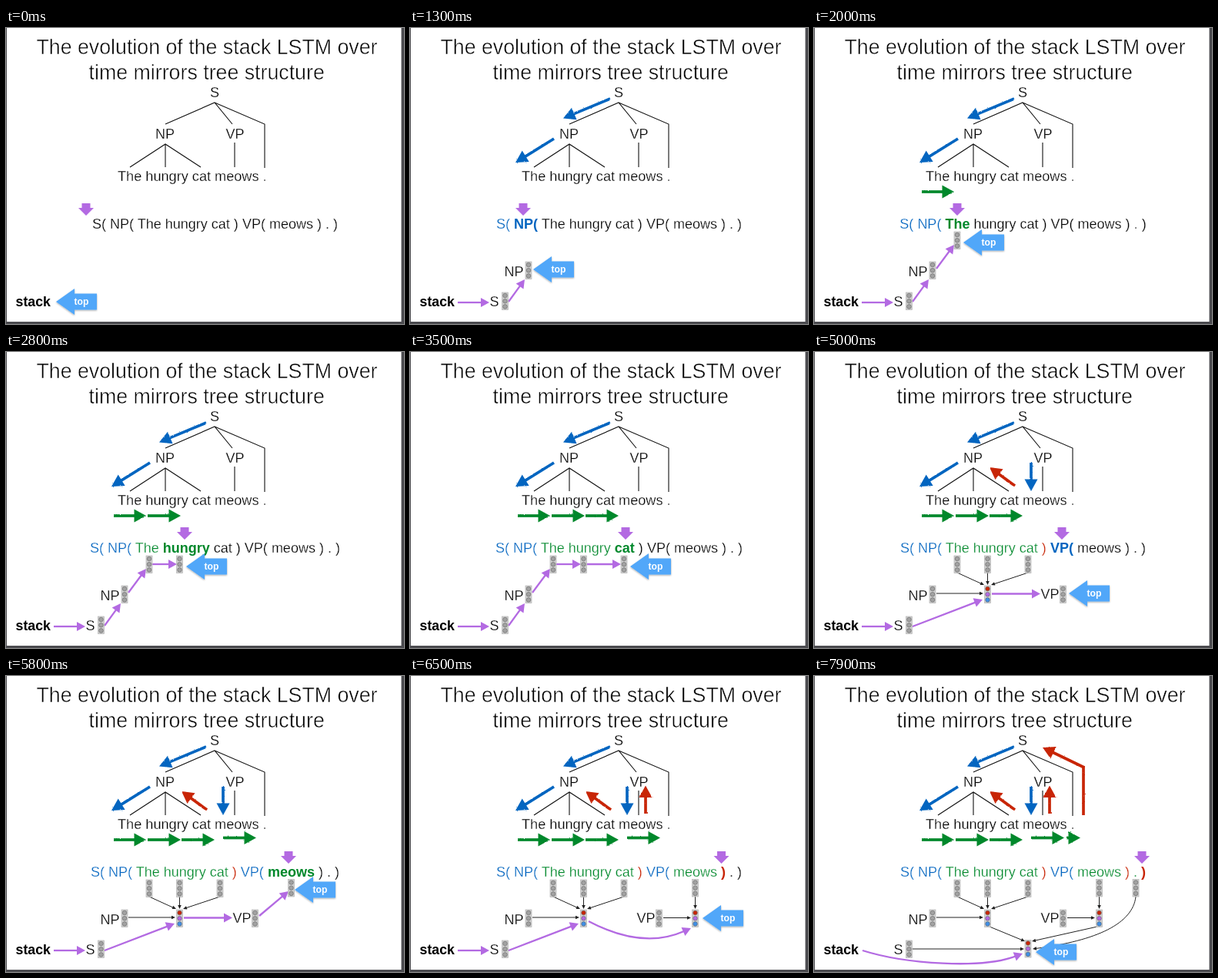
Write an HTML page that moves like this. It is 517x385 px and loops after 8 s.

```html
<!DOCTYPE html>
<html lang="en">
<head>
<meta charset="utf-8">
<title>Stack and tree</title>
<style>
  html, body { margin: 0; width: 100%; height: 100%; overflow: hidden; background: #fff; }
  svg { display: block; width: 517px; height: 385px; }
  text { font: 18px "Liberation Sans", Arial, sans-serif; white-space: pre; }
  /* A thin white outline lightens the strokes of the regular weight. */
  .light { stroke: #fff; stroke-width: .3px; }
  .title { font-size: 26.75px; stroke-width: .6px; }
  .bold { font-weight: 700; stroke: none; }
</style>
</head>
<body>
<svg id="stage" viewBox="0 0 517 385" xmlns="http://www.w3.org/2000/svg">
  <defs>
    <filter id="chalk" filterUnits="userSpaceOnUse" x="0" y="0" width="517" height="385" color-interpolation-filters="sRGB">
      <feTurbulence type="fractalNoise" baseFrequency=".4" numOctaves="2" seed="4"/>
      <feDisplacementMap in="SourceGraphic" scale="2" xChannelSelector="R" yChannelSelector="G"/>
    </filter>
    <filter id="shadow" x="-20%" y="-20%" width="140%" height="150%">
      <feDropShadow dx="0" dy="1" stdDeviation=".8" flood-opacity=".35"/>
    </filter>
  </defs>
</svg>
<script>
const BLUE = '#0365c0', GREEN = '#00882b', RED = '#c82506';
const PURPLE = '#b36ae2', SKY = '#51a7f9', BLACK = '#000', EDGE = '#4b4b4f';
const LOOP = 8000;
const STARTS = [0, 600, 1300, 2000, 2800, 3500, 4300, 5000, 5800, 6500, 7300, 7900];

const stage = document.getElementById('stage');
const timed = [];

function add(tag, attrs, parent = stage) {
  const node = document.createElementNS(stage.namespaceURI, tag);
  for (const key in attrs) node.setAttribute(key, attrs[key]);
  parent.append(node);
  return node;
}

function label(text, x, y, attrs = {}, parent = stage) {
  const node = add('text', { x, y, class: 'light', ...attrs }, parent);
  node.textContent = text;
  return node;
}

// A group visible from step `from` up to, not including, step `to`.
function during(from, to = Infinity) {
  const node = add('g', {});
  timed.push({ node, from, to });
  return node;
}

// Two points give a line, three a quadratic and four a cubic curve.
function arrow(parent, points, { color, width, length, half }) {
  const [x, y] = points.at(-1), [px, py] = points.at(-2);
  const size = Math.hypot(x - px, y - py);
  const ux = (x - px) / size, uy = (y - py) / size;
  const bx = x - ux * length, by = y - uy * length;
  const path = [...points.slice(1, -1), [bx + ux, by + uy]];
  add('path', {
    d: `M${points[0]} ${' LQC'[path.length]}${path.join(' ')}`,
    fill: 'none', stroke: color, 'stroke-width': width
  }, parent);
  add('path', {
    d: `M${x},${y} L${bx - uy * half},${by + ux * half} L${bx + uy * half},${by - ux * half}Z`,
    fill: color
  }, parent);
}

const LINK = { color: PURPLE, width: 2.3, length: 11, half: 6 };
const MERGE = { color: '#222', width: 1, length: 5, half: 2.3 };

const link = (from, to, ...points) => arrow(during(from, to), points, LINK);
const merge = (from, ...points) => arrow(during(from), points, MERGE);

function walk(from, color, ...points) {
  const group = during(from);
  group.setAttribute('filter', 'url(#chalk)');
  arrow(group, points, { color, width: 3.7, length: 15.5, half: 8.5 });
  return group;
}

function cell(from, x, y, colors = ['#a2a2a2', '#a2a2a2', '#a2a2a2']) {
  const group = during(from);
  add('rect', { x: x - 4, y: y - 11, width: 8, height: 22.5, fill: '#cfcfcf', stroke: '#b4b4b4', 'stroke-width': .7 }, group);
  colors.forEach((fill, i) => add('circle', {
    cx: x, cy: y - 7 + i * 7.2, r: 2.8, fill, stroke: '#666', 'stroke-width': .6
  }, group));
}
const mixed = (from, x, y) => cell(from, x, y, [RED, PURPLE, '#3f8fe6']);

// Slide edges and title
add('rect', { width: 517, height: 385, fill: EDGE });
add('rect', { x: 1, width: 512.5, height: 382, fill: '#fff' });
const titleStyle = { class: 'light title', 'text-anchor': 'middle' };
label('The evolution of the stack LSTM over', 261, 34, titleStyle);
label('time mirrors tree structure', 260.7, 67, titleStyle);

// Tree
add('path', {
  d: 'M207 125 L271 97 L294 125 M271 97 L336 125 V182 M161 181 L207 151 L253 181 M207 151 V181 M297 149 V181',
  fill: 'none', stroke: '#111', 'stroke-width': 1.1
});
const centered = { 'text-anchor': 'middle' };
label('S', 271, 90, centered);
label('NP', 206.5, 144, centered);
label('VP', 297.5, 144, centered);
label('The hungry cat meows .', 145, 198.5, { style: 'font-size:18.15px' });

// Walk around the tree
walk(1, BLUE, [260, 92], [199, 117.5]);
walk(2, BLUE, [187, 144], [137, 175]);
walk(3, GREEN, [140, 213], [182, 213]);
walk(4, GREEN, [184, 213], [227, 213]);
walk(5, GREEN, [228, 213], [271, 213]);
walk(6, RED, [261, 174], [228, 150]);
walk(7, BLUE, [282, 144], [282, 181]);
walk(8, GREEN, [282, 210.5], [325, 210.5]);
walk(9, RED, [306, 179], [306, 142.5]);
walk(10, GREEN, [328, 210.5], [346, 210.5]);
const back = walk(11, RED, [351, 119], [297, 93]);
add('path', { d: 'M350 181 V117', stroke: RED, 'stroke-width': 3.7 }, back);

// Action sequence
const TOKENS = [
  ['S(', BLUE], ['NP(', BLUE], ['The', GREEN], ['hungry', GREEN], ['cat', GREEN], [')', RED],
  ['VP(', BLUE], ['meows', GREEN], [')', RED], ['.', GREEN], [')', RED]
];
const sequence = label('', 271.5, 261, centered);
const spans = TOKENS.map(([word], i) => {
  const span = add('tspan', {}, sequence);
  span.textContent = word;
  if (i < TOKENS.length - 1) add('tspan', {}, sequence).textContent = ' ';
  return span;
});
const POINTER_X = [104, 121, 147, 186, 232, 280, 296.5, 322, 367, 404.5, 417, 426];
const pointer = add('path', { d: 'M-5.5 -16 H5.5 V-10 H10 L0 0 L-10 -10 H-5.5Z', fill: PURPLE });

// Stack
label('stack', 12.5, 361.5, { class: 'bold', style: 'font-size:17.8px' });
label('S', 103.5, 362, {}, during(1));
label('NP', 122.5, 322.5, {}, during(2));
label('VP', 294.5, 320.5, {}, during(7));

link(1, 11, [62, 357], [103, 357]);
link(2, 6, [128, 356], [149, 327]);
link(3, 6, [159, 313], [182, 282]);
link(4, 6, [190, 276], [222, 276]);
link(5, 6, [230, 276], [274, 276]);
link(6, 11, [128, 357], [219, 322]);
link(7, 9, [231, 314.5], [294, 314.5]);
link(8, 9, [329, 312], [367, 280]);
link(9, 11, [232, 319], [302, 356], [365, 328]);
link(10, 11, [376, 311], [414, 281]);
link(11, Infinity, [63, 357], [120, 375], [218, 381], [271, 361]);

merge(6, [186, 287], [221, 303]);
merge(6, [225.5, 287], [225.5, 303]);
merge(6, [278, 287], [230, 303]);
merge(6, [159, 314], [220, 314]);
merge(9, [329, 314.5], [365, 314.5]);
merge(9, [370.5, 287], [370.5, 303]);
merge(11, [228, 326], [274, 345]);
merge(11, [368, 326], [283, 345]);
merge(11, [418, 287], [414, 322], [368, 344], [284, 355]);
merge(11, [128, 355], [273, 355]);

cell(1, 123.5, 355);
cell(2, 154, 315);
cell(3, 186, 276);
cell(4, 225.5, 276);
cell(5, 278, 276);
mixed(6, 225.5, 315);
cell(7, 323.5, 315);
cell(8, 370.5, 275.5);
mixed(9, 370.5, 315);
cell(10, 418, 275.5);
mixed(11, 278, 354.5);

const TOPS = [
  [65, 356], [130, 356], [160, 314], [194, 279], [234, 279], [286, 279],
  [233, 314], [331, 314], [375, 278], [380, 315], [426, 278], [288, 359]
];
const marker = add('g', {});
add('path', { d: 'M0 0 L24 -17 V-10.5 H53 V10.5 H24 V17Z', fill: SKY, filter: 'url(#shadow)' }, marker);
label('top', 33, 4, { class: 'bold', fill: '#fff', 'text-anchor': 'middle', style: 'font-size:12.2px' }, marker);

function show(step) {
  for (const { node, from, to } of timed) {
    node.style.display = step >= from && step < to ? '' : 'none';
  }
  spans.forEach((span, i) => {
    span.setAttribute('fill', i < step ? TOKENS[i][1] : BLACK);
    span.setAttribute('class', i === step - 1 ? 'bold' : '');
  });
  pointer.setAttribute('transform', `translate(${POINTER_X[step]} 244)`);
  marker.setAttribute('transform', `translate(${TOPS[step]})`);
}

let shown = -1;
const begin = performance.now();
function frame() {
  const time = (performance.now() - begin) % LOOP;
  const step = STARTS.findLastIndex(start => time >= start);
  if (step !== shown) show(shown = step);
  requestAnimationFrame(frame);
}
frame();
</script>
</body>
</html>
```
